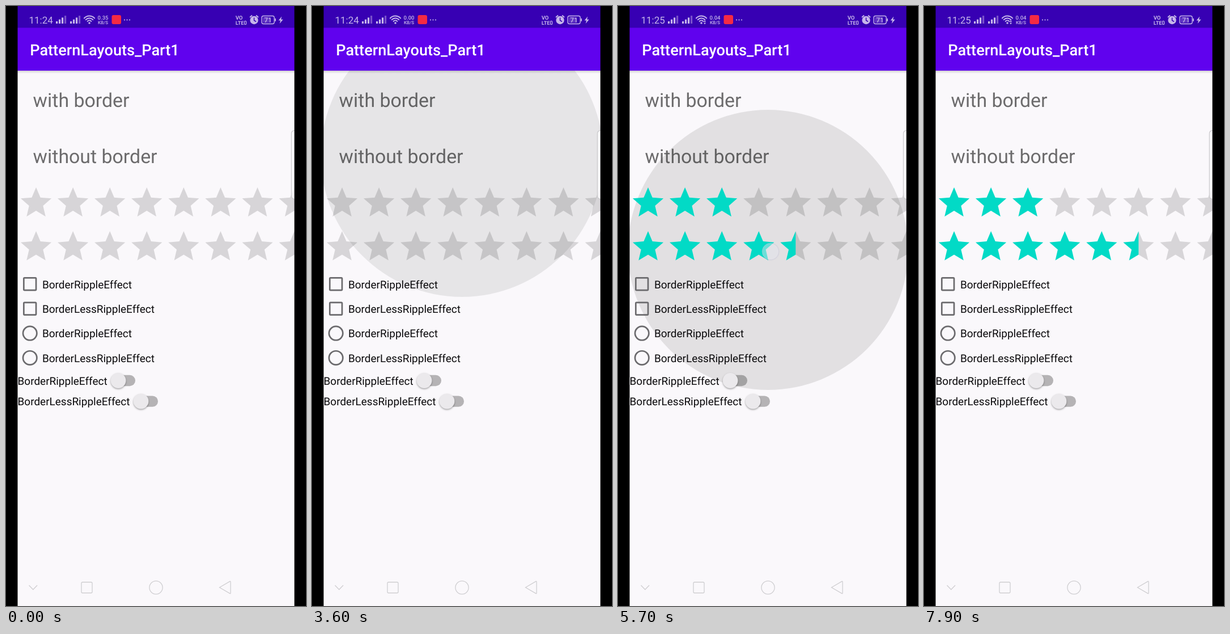
An HTML page with a canvas that plays this animation: 529x1058 px, repeating every 8000 ms.

```html
<!DOCTYPE html>
<html lang="en">
<head>
<meta charset="utf-8">
<title>Ripple effects</title>
<style>
  html, body { margin: 0; width: 100%; height: 100%; overflow: hidden; background: #000; }
  canvas { display: block; width: 100%; height: 100%; }
</style>
</head>
<body>
<canvas id="stage"></canvas>
<script>
const W = 529, H = 1058, LOOP = 8000, STEP = 100;
const LEFT = 20.5, RIGHT = 508.5, MID = 264.5, BAR_BOTTOM = 114;
const DP = 1.3556, STAR = 2 * DP, CELL = 48 * DP;
const canvas = document.getElementById('stage');
const ratio = window.devicePixelRatio || 1;
canvas.width = W * ratio;
canvas.height = H * ratio;
const g = canvas.getContext('2d');
g.scale(ratio, ratio);
g.textRendering = 'geometricPrecision';

const rows = {
  bordered: { top: 114, bottom: 213.6, bounded: true },
  borderless: { top: 214, bottom: 314, bounded: false },
  bar1: { top: 314, bottom: 391.3, bounded: true, starY: 314.3 },
  bar2: { top: 391.3, bottom: 468.6, bounded: false, starY: 391.6 }
};

// row, finger down, finger up, x, y
const taps = [
  ['bordered', 380, 560, 262, 166],
  ['bordered', 750, 900, 264, 167],
  ['bordered', 1100, 1230, 263, 166],
  ['borderless', 1980, 2200, 262, 275],
  ['borderless', 2450, 2600, 262, 276],
  ['borderless', 2684, 2840, 262.5, 277],
  ['borderless', 2980, 3110, 262, 277],
  ['borderless', 3270, 3420, 263, 277],
  ['bar1', 3913, 4180, 283.5, 356],
  ['bar1', 4350, 4560, 195, 356],
  ['bar2', 4880, 5060, 230, 432],
  ['bar2', 5250, 5640, 269, 433],
  ['bar2', 5890, 6050, 300, 433],
  ['bar2', 6300, 6450, 240, 431],
  ['bar2', 6775, 6920, 183, 427],
  ['bar2', 6960, 7120, 137, 437],
  ['bar2', 7350, 7480, 340, 433]
].map(([row, down, up, x, y]) => ({ row, down, up, x, y }));
const ratings = [4.5, 3, 3.5, 4.5, 5, 4, 2.5, 2, 5.5];
taps.filter(t => rows[t.row].starY).forEach((t, i) => { t.rating = ratings[i]; });

const ENTER = 225, FADE_IN = 45, FADE_OUT = 300, TOUCH_OUT = 180, RATE_DELAY = 100;
const starPath = new Path2D('M12 17.27 18.18 21 16.54 13.97 22 9.24 14.81 8.63 12 2 9.19 8.63 2 9.24 7.46 13.97 5.82 21z');
const clamp = v => Math.max(0, Math.min(1, v));
const mix = (a, b, p) => a + (b - a) * p;

function rect(x, y, w, h, fill) {
  g.fillStyle = fill;
  g.fillRect(x, y, w, h);
}

function rounded(x, y, w, h, r, fill, stroke, width = 1) {
  g.beginPath();
  g.roundRect(x, y, w, h, r);
  paint(fill, stroke, width);
}

function disc(x, y, r, fill, stroke, width = 1) {
  g.beginPath();
  g.arc(x, y, r, 0, Math.PI * 2);
  paint(fill, stroke, width);
}

function shape(d, fill, stroke, width = 1) {
  const path = new Path2D(d);
  if (fill) { g.fillStyle = fill; g.fill(path); }
  if (stroke) { g.strokeStyle = stroke; g.lineWidth = width; g.stroke(path); }
}

function paint(fill, stroke, width) {
  if (fill) { g.fillStyle = fill; g.fill(); }
  if (stroke) { g.strokeStyle = stroke; g.lineWidth = width; g.stroke(); }
}

function text(s, x, y, size, color, weight = 400, align = 'left') {
  g.font = `${weight} ${size}px Roboto, sans-serif`;
  g.textAlign = align;
  g.fillStyle = color;
  g.fillText(s, x, y);
}

function clipped(x, y, w, h, draw) {
  g.save();
  g.beginPath();
  g.rect(x, y, w, h);
  g.clip();
  draw();
  g.restore();
}

function drawRipple(tap, t) {
  const end = Math.max(tap.up, tap.down + ENTER);
  if (t < tap.down || t >= end + FADE_OUT) return;
  const row = rows[tap.row];
  const cy = (row.top + row.bottom) / 2;
  const full = Math.hypot(244, (row.bottom - row.top) / 2);
  const grow = clamp((t - tap.down) / ENTER);
  const shift = 1 - (1 - grow) ** 3.3;
  const alpha = 0.122 * clamp((t - tap.down) / FADE_IN) * (1 - clamp((t - end) / FADE_OUT));
  const top = row.bounded ? row.top : BAR_BOTTOM;
  const bottom = row.bounded ? row.bottom : H;
  clipped(0, top, W, bottom - top, () =>
    disc(mix(tap.x, MID, shift), mix(tap.y, cy, shift), mix(146, full, grow), `rgba(0,0,0,${alpha})`));
}

function drawTouch(tap, t) {
  if (t < tap.down || t >= tap.up + TOUCH_OUT) return;
  g.save();
  g.globalAlpha = (1 - clamp((t - tap.up) / TOUCH_OUT)) ** 2;
  g.shadowColor = 'rgba(120,120,170,.3)';
  g.shadowBlur = 3;
  disc(tap.x, tap.y, 14.5, 'rgba(248,247,251,.88)');
  g.shadowColor = 'transparent';
  disc(tap.x, tap.y, 14.5, null, '#c9c8d8', 1.5);
  g.restore();
}

function drawStars(name, t) {
  const y = rows[name].starY;
  const mine = taps.filter(k => k.row === name);
  const rated = mine.filter(k => t >= k.down + RATE_DELAY).pop();
  const rating = rated ? rated.rating : 0;
  const pressed = mine.some(k => t >= k.down && t < k.up);
  const edge = LEFT + rating * CELL;
  const strip = (from, to, color) => clipped(from, y, Math.max(0, to - from), CELL, () => {
    for (let i = 0; i < 8; i++) {
      g.save();
      g.translate(LEFT + i * CELL, y);
      g.scale(STAR, STAR);
      g.fillStyle = color;
      g.fill(starPath);
      g.restore();
    }
  });
  strip(LEFT, edge, '#02dac6');
  strip(edge, W, pressed ? 'rgba(2,218,198,.27)' : 'rgba(0,0,0,.14)');
}

function drawAppBar() {
  const shade = g.createLinearGradient(0, BAR_BOTTOM, 0, BAR_BOTTOM + 5);
  shade.addColorStop(0, 'rgba(0,0,0,.16)');
  shade.addColorStop(1, 'rgba(0,0,0,0)');
  rect(0, BAR_BOTTOM, W, 5, shade);
  rect(0, 0, W, BAR_BOTTOM, '#6002ee');
  text('PatternLayouts_Part1', 42.2, 86.5, 20 * DP, '#fff', 500);
}

function drawStatus(t) {
  const ink = '#c6b6ea', dim = '#7a52cb';
  rect(0, 0, W, 38.4, '#3700b3');
  text(t < 3800 ? '11:24' : '11:25', 40.5, 31, 17, ink);
  for (const x of [88, 113]) {
    for (let i = 0; i < 4; i++) {
      const h = 4 + i * 3.3;
      rect(x + i * 5, 31 - h, 3.2, h, i < 3 ? ink : dim);
    }
  }
  g.lineCap = 'round';
  for (const r of [4.5, 8.5, 12.5]) {
    g.beginPath();
    g.arc(147, 30, r, -Math.PI * 0.76, -Math.PI * 0.24);
    paint(null, ink, 2);
  }
  g.lineCap = 'butt';
  disc(147, 30, 1.8, ink);
  if (t >= 3800) shape('M151 28l2-3 2 3zM151 29.5l2 3 2-3z', ink);
  const speed = t < 800 ? '0.35' : t < 5000 ? '0.00' : '0.04';
  text(speed, 171, 23.5, 9.5, ink, 500, 'center');
  text('KB/S', 171, 32, 8, ink, 500, 'center');
  rounded(186.5, 16, 16.5, 16, 3, '#f52a43');
  for (const x of [209, 213.5, 218]) disc(x, 24.5, 1.1, ink);

  text('VO', 411, 23.5, 9.5, ink, 700, 'center');
  text('LTE', 412, 33, 9, ink, 700, 'center');
  rounded(420.5, 26.5, 3, 6, 1, null, ink, 1.2);
  disc(437.5, 25, 7.2, ink);
  shape('M430 20l4-3.5M441 16.5l4 3.5', null, ink, 2);
  shape('M437.5 20.5v5l3.5 2', null, '#3700b3', 1.5);
  rounded(453, 19.5, 13, 10, 1, 'rgba(198,182,234,.3)');
  rounded(451, 17.5, 22, 14, 3, null, ink, 1.4);
  rect(474, 22, 1.8, 5, ink);
  text('71', 462, 29, 12, ink, 500, 'center');
  shape('M486 18.5l-5.5 7h3.4l-1.3 5.5 6-7.3h-3.6z', ink);
}

function drawControls() {
  const labels = ['BorderRippleEffect', 'BorderLessRippleEffect'];
  const outline = '#6b6a6d', ink = '#0b0a0c', size = 14 * DP, line = 2 * DP;
  const boxX = LEFT + 16 * DP, half = 8 * DP;
  for (let i = 0; i < 4; i++) {
    const y = 490.3 + i * 32 * DP;
    if (i < 2) rounded(boxX - half, y - half, 2 * half, 2 * half, DP, null, outline, line);
    else disc(boxX, y, 9 * DP, null, outline, line);
    text(labels[i % 2], LEFT + 32 * DP, y + 7.3, size, ink);
  }
  [[198, 660.5], [238, 697.1]].forEach(([x, y], i) => {
    text(labels[i], LEFT, y + 7.2, size, ink);
    rounded(x - 10, y - 9.7, 40, 19.4, 9.7, 'rgba(0,0,0,.28)');
    g.save();
    g.shadowColor = 'rgba(0,0,0,.35)';
    g.shadowBlur = 3;
    g.shadowOffsetY = 1.5;
    disc(x, y, 13.4, '#ebe9ec');
    g.restore();
  });
}

function drawNavigation() {
  const line = '#cfced1';
  shape('M40.5 1021.5l7.3 7.5 7.3-7.5', null, line, 1.3);
  rounded(133, 1016, 19, 19, 2, null, line, 1.3);
  disc(264.5, 1025.5, 11.6, null, line, 1.3);
  shape('M376.5 1025.2l18.2-10.6q1.3-.6 1.3.8v19.6q0 1.4-1.3.8z', null, line, 1.3);
}

function drawLetterbox() {
  rect(0, 0, LEFT, H, '#000');
  rect(RIGHT, 0, W - RIGHT, H, '#000');
}

function draw(t) {
  rect(0, 0, W, H, '#faf8fb');
  if (t >= 1600 && t < 2000) rect(0, rows.bordered.top, W, 99.6, '#f7f7f7');
  taps.forEach(tap => drawRipple(tap, t));
  drawAppBar();
  drawStatus(t);
  const labelX = LEFT + 20 * DP;
  text('with border', labelX, 177.5, 25 * DP, 'rgba(0,0,0,.57)');
  text('without border', labelX, 277.4, 25 * DP, 'rgba(0,0,0,.57)');
  drawStars('bar1', t);
  drawStars('bar2', t);
  drawControls();
  rounded(503.3, 219.5, 40, 121, 5, 'rgba(252,252,253,.8)', '#c9c8cb', 1.2);
  drawNavigation();
  taps.forEach(tap => drawTouch(tap, t));
  drawLetterbox();
}

const start = performance.now();
function tick() {
  const t = (performance.now() - start) % LOOP;
  draw(Math.floor(t / STEP) * STEP);
  requestAnimationFrame(tick);
}
tick();
</script>
</body>
</html>
```
